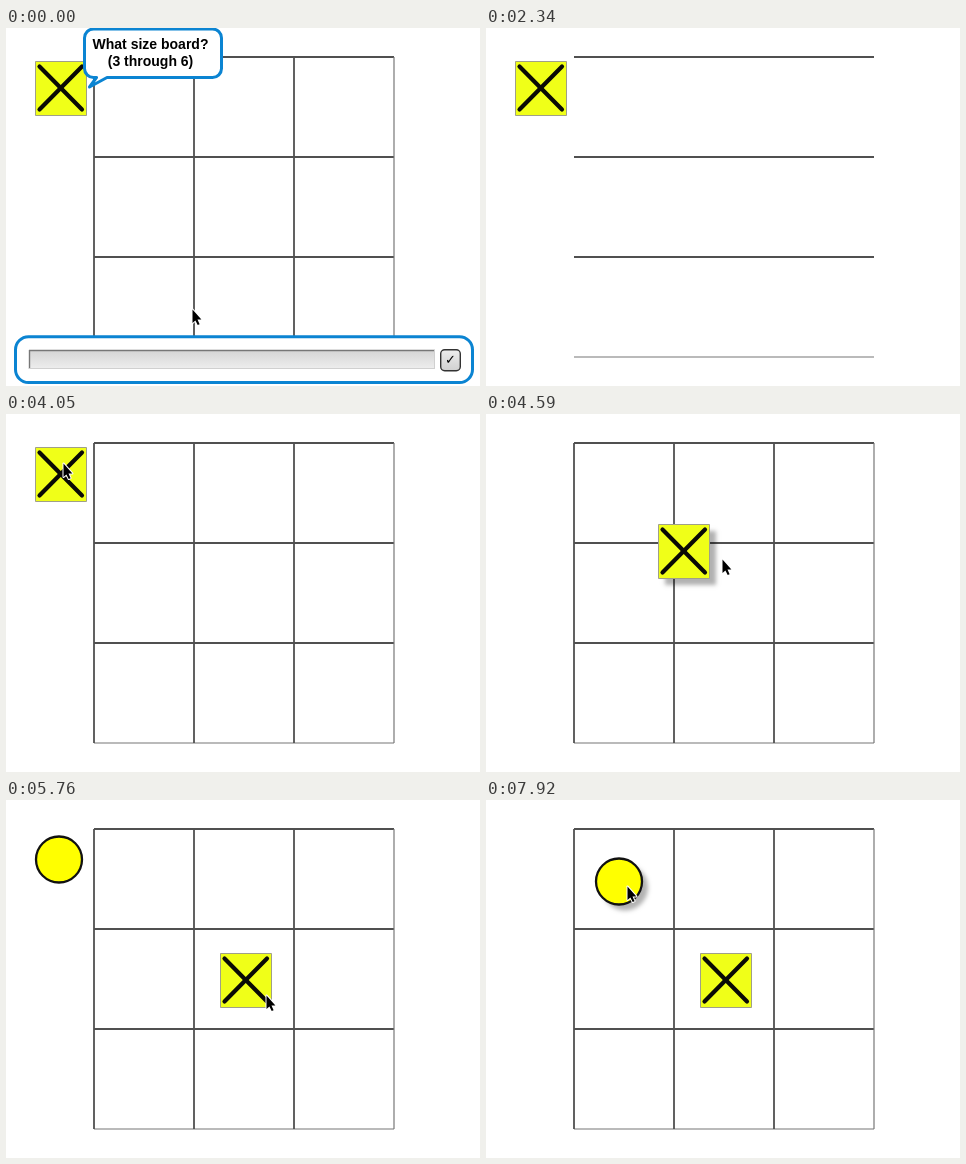
Recreate the animation shown at these times as an HTML page with a canvas. Size 474x358 px, loop 8000 ms.

```html
<!DOCTYPE html>
<html lang="en">
<head>
<meta charset="utf-8">
<title>Board game</title>
<style>
html, body { margin: 0; width: 100%; height: 100%; overflow: hidden; background: #fff; }
canvas { display: block; }
</style>
</head>
<body>
<canvas id="stage" width="474" height="358"></canvas>
<script>
const ctx = document.getElementById('stage').getContext('2d');
const LOOP = 8000, STEP = 90;
const BLUE = '#0b84d2', GREY = '#b3b3b3';
const LEFT = 88, TOP = 29, CELL = 100, SIZE = CELL * 3;
const SANS = '"Liberation Sans", Arial, sans-serif';
const ARROW = new Path2D('M0.5 0.5V14L3.4 11.4L5.7 16L7.6 15.2L5.5 10.4H9.4Z');

const linear = k => k;
const easeOut = k => Math.sin(k * Math.PI / 2);
const within = (t, from, to) => t >= from && t < to;

// Each pointer move ends at (x, y); it rests there until the next one
const START = { x: 186, y: 281 };
const moves = [
  { from: 360, to: 540, x: 19, y: 336, ease: linear },    // to the answer field
  { from: 2970, to: 3150, x: 175, y: 262, ease: linear }, // while hidden
  { from: 3150, to: 3600, x: 32, y: 62, ease: easeOut },
  { from: 3600, to: 3690, x: 74, y: 67, ease: linear },
  { from: 3780, to: 4050, x: 57, y: 49, ease: easeOut },  // picks up the cross
  { from: 4140, to: 4590, x: 236, y: 145, ease: linear },
  { from: 4590, to: 4950, x: 287, y: 186, ease: easeOut },
  { from: 4950, to: 5040, x: 266, y: 185, ease: linear },
  { from: 5130, to: 6300, x: 255, y: 203, ease: linear },
  { from: 6300, to: 6840, x: 52, y: 77, ease: easeOut },
  { from: 6840, to: 7020, x: 67, y: 65, ease: linear },
  { from: 7020, to: 7200, x: 61, y: 64, ease: easeOut },  // picks up the ring
  { from: 7290, to: 7830, x: 141, y: 86, ease: easeOut }
];

function pointerAt(t) {
  let { x, y } = START;
  for (const m of moves) {
    if (t <= m.from) break;
    const k = m.ease(Math.min(1, (t - m.from) / (m.to - m.from)));
    x += (m.x - x) * k;
    y += (m.y - y) * k;
  }
  return [Math.round(x), Math.round(y)];
}

function line(x0, y0, x1, y1, color, width) {
  ctx.strokeStyle = color;
  ctx.lineWidth = width;
  ctx.beginPath();
  ctx.moveTo(x0, y0);
  ctx.lineTo(x1, y1);
  ctx.stroke();
}

function label(text, x, y, font, align = 'left') {
  ctx.fillStyle = '#000';
  ctx.font = font;
  ctx.textAlign = align;
  ctx.fillText(text, x, y);
}

function paint(path, fill, stroke, width) {
  ctx.fillStyle = fill;
  ctx.fill(path);
  ctx.strokeStyle = stroke;
  ctx.lineWidth = width;
  ctx.stroke(path);
}

function box(x, y, w, h, r, fill, stroke, width) {
  const path = new Path2D();
  path.roundRect(x, y, w, h, r);
  paint(path, fill, stroke, width);
}

function shade(y0, y1, from, to) {
  const g = ctx.createLinearGradient(0, y0, 0, y1);
  g.addColorStop(0, from);
  g.addColorStop(1, to);
  return g;
}

function drawGrid(count) {
  for (let i = 0; i < count; i++) {
    const n = i % 4, d = n * CELL;
    const color = n < 3 ? '#505050' : '#777';
    const width = n < 3 ? 1.8 : 1.2;
    if (i < 4) line(LEFT, TOP + d, LEFT + SIZE, TOP + d, color, width);
    else line(LEFT + d, TOP, LEFT + d, TOP + SIZE, color, width);
  }
}

// Fills a piece, with a soft shadow while it is held
function fillPiece(path, color, lifted) {
  ctx.save();
  if (lifted) {
    ctx.shadowColor = 'rgba(0,0,0,0.3)';
    ctx.shadowOffsetX = ctx.shadowOffsetY = 6;
    ctx.shadowBlur = 4;
  }
  ctx.fillStyle = color;
  ctx.fill(path);
  ctx.restore();
}

function drawCross(x, y, lifted) {
  const tile = new Path2D();
  tile.rect(0.5, 0.5, 51, 54);
  ctx.save();
  ctx.translate(x, y);
  fillPiece(tile, '#f0ff18', lifted);
  ctx.strokeStyle = '#a0a088';
  ctx.lineWidth = 1;
  ctx.stroke(tile);
  ctx.lineCap = 'round';
  line(4.5, 5.5, 47, 48.5, '#0a0a05', 4.2);
  line(47, 5.5, 4.5, 48.5, '#0a0a05', 4.2);
  ctx.restore();
}

function drawRing(x, y, lifted) {
  const disc = new Path2D();
  disc.arc(x, y, 23, 0, Math.PI * 2);
  fillPiece(disc, '#ff0', lifted);
  ctx.strokeStyle = '#111';
  ctx.lineWidth = 2.3;
  ctx.stroke(disc);
}

function drawBubble(lines, color) {
  const l = 78.5, r = 215.5, t = 1, b = 16.5 + lines.length * 16.5, c = 9;
  const path = new Path2D();
  path.moveTo(l + c, t);
  path.arcTo(r, t, r, b, c);
  path.arcTo(r, b, l, b, c);
  path.lineTo(101, b);
  path.lineTo(83.5, b + 9.5);
  path.lineTo(90.5, b);
  path.arcTo(l, b, l, t, c);
  path.arcTo(l, t, r, t, c);
  path.closePath();
  ctx.lineJoin = 'round';
  paint(path, '#fff', color, 3);
  lines.forEach((s, i) => label(s, 144.5, 21 + i * 17, 'bold 14px ' + SANS, 'center'));
}

function drawPrompt(answer, caret) {
  box(9.5, 308.7, 457, 45.8, 13, '#fff', BLUE, 3);
  ctx.fillStyle = shade(322, 341, '#d4d4d4', '#eee');
  ctx.fillRect(23, 322, 406, 19);
  line(23, 322.5, 429, 322.5, '#777', 1.4);
  line(23.5, 322, 23.5, 341, '#777', 1.4);
  line(23, 340.5, 429, 340.5, '#d0d0d0', 1);
  line(428.5, 322, 428.5, 341, '#d0d0d0', 1);
  label(answer, 25, 337, '12px ' + SANS);
  if (caret) line(32.5, 325, 32.5, 339, '#222', 1);

  box(434.7, 321.7, 19.6, 21, 4, shade(321, 343, '#eee', '#d0d0d0'), '#333', 1.4);
  label('✓', 444.5, 336, 'bold 13px "DejaVu Sans", sans-serif', 'center');
}

function drawPointer(x, y) {
  ctx.save();
  ctx.translate(x, y);
  ctx.lineJoin = 'round';
  ctx.strokeStyle = '#fff';
  ctx.lineWidth = 2;
  ctx.stroke(ARROW);
  ctx.fillStyle = '#000';
  ctx.fill(ARROW);
  ctx.restore();
}

function drawPieces(t) {
  // A dragged piece trails the pointer by one step
  const [px, py] = pointerAt(t - STEP);
  if (t >= 5220) drawCross(214, 153, false);
  else if (t >= 4230) drawCross(px - 28, py - 16, true);
  else if (!within(t, 2700, 2790)) drawCross(29, 33, false);

  if (t >= 7380) drawRing(px - 8, py - 4.5, true);
  else if (t >= 5490) drawRing(53, 59.5, false);
}

function draw(t) {
  ctx.fillStyle = '#fff';
  ctx.fillRect(0, 0, 474, 358);

  // The board is cleared and ruled again after the answer
  drawGrid(within(t, 2160, 2520) ? (t - 2160) / STEP * 2 : 8);
  drawPieces(t);

  if (t < 2160) {
    drawBubble(['What size board?', '(3 through 6)'], BLUE);
    drawPrompt(t >= 630 ? '3' : '', within(t, 630, 990) || within(t, 1530, 2070));
  } else if (within(t, 2520, 3600)) {
    drawBubble(['Drag me onto the', 'game board to', 'play.'], GREY);
  }

  if (!within(t, 630, 3150)) drawPointer(...pointerAt(t));
}

function tick() {
  const t = performance.now() % LOOP;
  draw(Math.floor(t / STEP) * STEP);
  requestAnimationFrame(tick);
}
tick();
</script>
</body>
</html>
```
